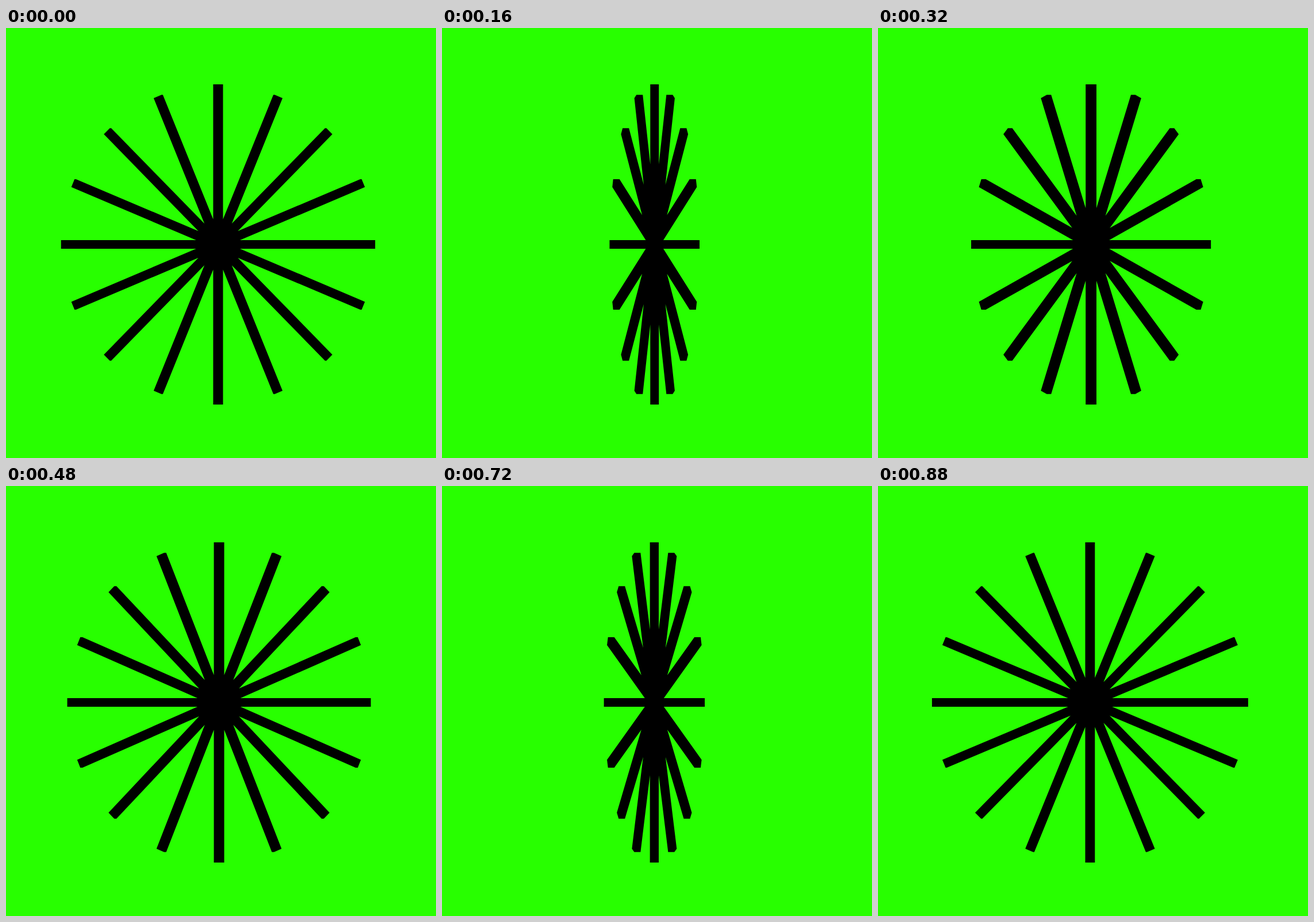
Write an HTML page that moves like this. It is 748x748 px and loops after 920 ms.

```html
<!DOCTYPE html>
<html lang="en">
<head>
<meta charset="utf-8">
<title>Spinning star</title>
<style>
  html, body { margin: 0; height: 100%; overflow: hidden; background: #28ff00; }
  svg { display: block; width: 100%; height: 100%; }
</style>
</head>
<body>
<svg viewBox="0 0 748 748"><path id="star"/></svg>
<script>
const LOOP = 920, STEP = 40;
const LENGTH = 278.5, WIDTH = 7.5, DEPTH = 5.7; // half sizes of one bar
const CORNERS = [[-LENGTH, -WIDTH], [LENGTH, -WIDTH], [LENGTH, WIDTH], [-LENGTH, WIDTH]];
const star = document.getElementById('star');

// Outline of a flat bar swept sideways by its turned depth.
function bar(tilt, squash, sweep, cx) {
  const cos = Math.cos(tilt), sin = Math.sin(tilt);
  const points = CORNERS.map(([x, y]) => [(x * cos - y * sin) * squash, x * sin + y * cos]);
  const outline = points.flatMap((p, i) => {
    const q = points[(i + 1) % 4];
    const shift = cx + Math.sign(q[1] - p[1]) * sweep;
    return [p, q].map(([x, y]) => (x + shift).toFixed(2) + ',' + (y + 376.5).toFixed(2));
  });
  return 'M' + outline.join('L') + 'Z';
}

// A 30 fps turn sampled at 25 fps, so some steps skip a pose.
function turnAt(ms) {
  const pose = Math.floor(Math.floor(ms / STEP) * 1.2 + 0.9);
  return (12.4 + 12.49 * pose) * Math.PI / 180;
}

function draw(now) {
  const turn = turnAt(now % LOOP);
  const cos = Math.cos(turn), sin = Math.sin(turn);
  const cx = 369.8 - 0.9 * cos + 0.2 * sin; // the star sits slightly off its axis
  let d = '';
  for (let i = 0; i < 8; i++) {
    d += bar(i * Math.PI / 8, Math.abs(cos), DEPTH * Math.abs(sin), cx);
  }
  star.setAttribute('d', d);
}

const start = performance.now();
function tick() {
  draw(performance.now() - start);
  requestAnimationFrame(tick);
}
tick();
</script>
</body>
</html>
```
